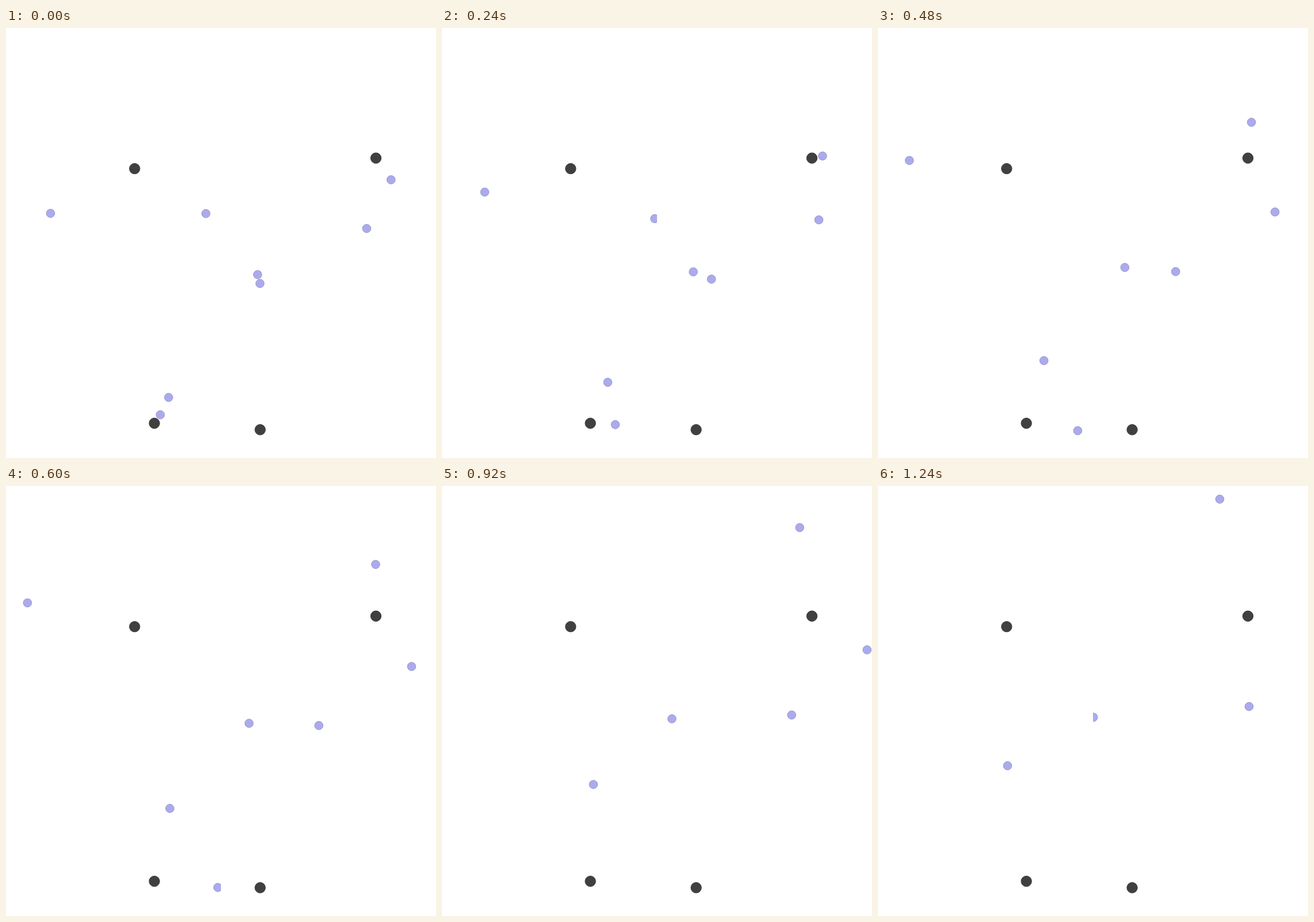
Animation of 748 by 748 pixels, one loop 1280 ms. Source, as an HTML page with a canvas:

```html
<!DOCTYPE html>
<html lang="en">
<head>
<meta charset="utf-8">
<title>Moving particles</title>
<style>
  html, body { margin: 0; width: 100%; height: 100%; overflow: hidden; background: #fff; }
  canvas { display: block; }
</style>
</head>
<body>
<canvas id="stage" width="748" height="748"></canvas>
<script>
const ctx = document.getElementById('stage').getContext('2d');
const SIZE = 748, HALF = SIZE / 2, LOOP = 1280, STEP = 40, EASE = 0.1;

// A drifter follows start + velocity·s + bend·s² + twist·s³, in pixels and eased seconds.
const drifter = (start, velocity, bend, twist = [0, 0]) => s =>
  start.map((p, axis) => p + s * (velocity[axis] + s * (bend[axis] + s * twist[axis])));

// Each quarter of the stage clips its own drifters.
const panels = [
  { x: 0, y: 0, anchor: [223.8, 244.7], drifters: [
    drifter([77.4, 322.4], [4, -252], [-168, 27.6]),
    drifter([347.7, 322.8], [149.6, 47], [0, 83.5])
  ] },
  { x: HALF, y: 0, anchor: [643.5, 226.3], drifters: [
    drifter([669.8, 264], [-54, -286], [9.6, 59.3], [-17.7, 5.3]),
    drifter([627.4, 348.8], [206.2, -127.2], [-123.5, 201], [47, -171.7])
  ] },
  { x: 0, y: HALF, anchor: [258.1, 687.6], drifters: [
    drifter([282.9, 642.6], [51, -181.8], [-97, 34.8], [7, 4.1]),
    drifter([268.4, 672.8], [231, 142], [-62, -182])
  ] },
  { x: HALF, y: HALF, anchor: [442.1, 698.8], drifters: [
    drifter([437.7, 429], [10.2, -31.2], [-97.3, -9.2], [35, 14]),
    drifter([441.8, 444.4], [162, -46.9], [140.4, -26], [-110.3, 17.9])
  ] }
];

// Eased time: starts at rest and settles to normal speed.
const easedTime = t => t - EASE * (1 - Math.exp(-t / EASE));

function dot([x, y], radius, fill, stroke) {
  ctx.beginPath();
  ctx.arc(x, y, radius, 0, 2 * Math.PI);
  ctx.fillStyle = fill;
  ctx.fill();
  ctx.strokeStyle = stroke;
  ctx.stroke();
}

function draw(ms) {
  const s = easedTime(ms / 1000);
  ctx.clearRect(0, 0, SIZE, SIZE);
  for (const { x, y, anchor, drifters } of panels) {
    ctx.save();
    ctx.beginPath();
    ctx.rect(x, y, HALF, HALF);
    ctx.clip();
    dot(anchor, 9.2, '#404040', '#3c3c3c');
    for (const at of drifters) dot(at(s), 7.3, '#ababec', '#9494cc');
    ctx.restore();
  }
}

const start = performance.now();
function tick() {
  const t = (performance.now() - start) % LOOP;
  draw(Math.floor(t / STEP) * STEP);
  requestAnimationFrame(tick);
}
tick();
</script>
</body>
</html>
```
